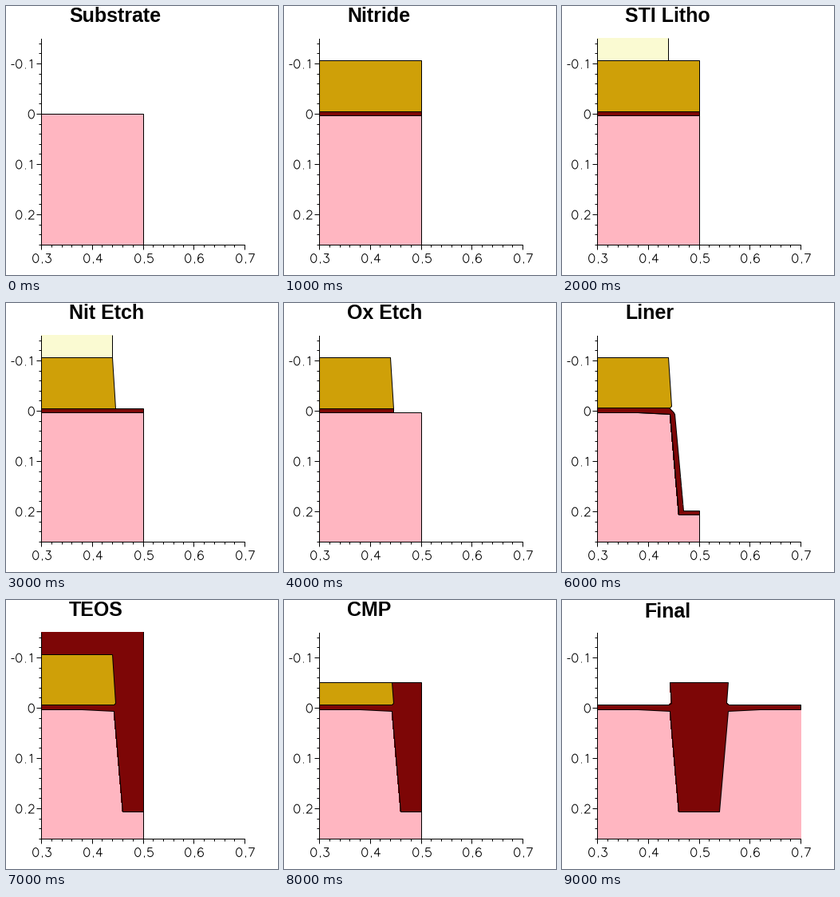
Animation, 341 px wide and 337 px high, one loop 10000 ms. Source, as a matplotlib script:

```python
import numpy as np
import matplotlib.pyplot as plt
from matplotlib.animation import ArtistAnimation

W, H, DPI = 341, 337, 64
PX = 72 / DPI
SILICON, OXIDE, NITRIDE, RESIST = "#ffb6c1", "#7d0606", "#cfa008", "#fafad2"

# Key positions of the cross-section, in pixels
LEFT, EDGE, RIGHT = 44, 172, 299
TOP, BASE = 40, 299
NIT_TOP, PAD_TOP, PAD_BOT, CMP_TOP = 68, 132, 137, 103
MASK = 133
SLOPE = np.tan(np.radians(5))

fig = plt.figure(figsize=(W / DPI, H / DPI), dpi=DPI, facecolor="white")
ax = fig.add_axes([0, 0, 1, 1])
ax.set_xlim(0, W)
ax.set_ylim(H, 0)
ax.axis("off")


def arc(cx, cy, rx, ry, start, end):
    t = np.radians(np.linspace(start, end, 25))
    return list(zip(cx + rx * np.cos(t), cy + ry * np.sin(t)))


# Stroke glyphs on a 20 x 21 grid, y up
GLYPHS = {
    "0": arc(10, 10.5, 7, 10.5, 0, 360),
    "1": [(6, 17), (11, 21), (11, 0)],
    "2": arc(10, 15, 6, 6, 170, -30) + [(3, 0), (17, 0)],
    "3": [(5, 21), (16, 21), (10, 13)] + arc(10, 6.5, 7, 6.5, 90, -160),
    "4": [(13, 0), (13, 21), (3, 7), (18, 7)],
    "5": [(15, 21), (5, 21), (4, 12)] + arc(10, 7, 7, 7, 130, -155),
    "6": arc(11, 10.5, 7, 10.5, 45, 180) + arc(10.5, 6.5, 6.5, 6.5, 180, -180),
    "7": [(3, 21), (17, 21), (7, 0)],
    ".": [(5, 0), (5, 2)],
    "-": [(1, 9), (9, 9)],
}
SCALE = 0.52


def advance(ch):
    return SCALE * (10 if ch in ".-" else 20)


def line(pts, cap="projecting", snap=True, z=2):
    return ax.plot(*zip(*pts), color="black", lw=PX, snap=snap, zorder=z,
                   solid_capstyle=cap, solid_joinstyle="miter")[0]


def label(text, x, base, align):
    x -= align * sum(map(advance, text))
    for ch in text:
        line([(x + SCALE * u, base - SCALE * v) for u, v in GLYPHS[ch]], "butt", None)
        x += advance(ch)


def draw_axes():
    line([(LEFT, TOP + 1), (LEFT, BASE)], z=4)
    line([(LEFT, BASE), (RIGHT, BASE)], z=4)
    for i in range(-7, 21):
        size = 6 if i % 5 == 0 else 3
        if i >= 0:
            x = round(LEFT + 12.75 * i)
            line([(x, BASE), (x, BASE + size)], "butt")
            if size == 6:
                label(f"{0.3 + 0.02 * i:.1f}", x + 1, 321.5, 0.5)
        if i <= 13:
            y = round(135 + 12.6 * i)
            line([(LEFT - size, y), (LEFT, y)], "butt")
            if size == 6:
                label(f"{0.02 * i:.1f}" if i else "0", 37, y + 6, 1)


def fill(color, pts):
    return ax.fill(*zip(*pts), color=color, lw=0, antialiased=False, zorder=1)[0]


def shape(color, pts):
    return [fill(color, pts), line(pts + pts[:1])]


def box(x0, y0, x1, y1):
    return [(x0, y0), (x1, y0), (x1, y1), (x0, y1)]


def title(text, x=79, base=20.5):
    return [ax.text(x, base, text, family="Liberation Sans", weight="bold",
                    size=25 * PX, va="baseline", ha="left")]


def wall(x, top, floor):
    """Sloped trench side and the floor out to the edge."""
    return [(x, top), (x + SLOPE * (floor - top), floor), (EDGE, floor)]


def block(top=PAD_BOT):
    return shape(SILICON, box(LEFT, top, EDGE, BASE))


def trench(surface):
    return shape(SILICON, surface + [(EDGE, BASE), (LEFT, BASE)])


def pad(right=EDGE):
    return shape(OXIDE, box(LEFT, PAD_TOP, right, PAD_BOT))


def nitride(corner=MASK, foot=MASK + 4, top=NIT_TOP, bottom=PAD_TOP, cut=0):
    """Nitride slab; cut trims its lower right corner."""
    return shape(NITRIDE, [(LEFT, top), (corner, top), (foot, bottom - cut),
                           (foot - cut, bottom), (LEFT, bottom)])


def resist():
    return [fill(RESIST, box(LEFT, TOP, MASK, NIT_TOP)),
            line([(MASK, TOP), (MASK, NIT_TOP)], "butt")]


def oxide_fill(top):
    """Oxide over the well, outlined on top only when polished."""
    edge = [(EDGE, top), (EDGE, WELL[-1][1])]
    if top > TOP:
        edge.insert(0, (LEFT, top))
    return [fill(OXIDE, [(LEFT, top), (EDGE, top)] + WELL[::-1]), line(edge)]


def mirror(pts):
    return [(LEFT + RIGHT - x, y) for x, y in pts]


def final():
    upper = [(LEFT, PAD_TOP - 1), (MASK + 1, PAD_TOP - 1),
             (MASK + 4, PAD_TOP - 3), (MASK + 2, CMP_TOP)]
    lower = WELL[:-1]
    outline = upper + mirror(upper)[::-1] + mirror(lower) + lower[::-1]
    return [fill(SILICON, box(LEFT, PAD_BOT, RIGHT + 1, BASE))] + shape(OXIDE, outline)


FLAT = [(LEFT, PAD_BOT)]
WELL = FLAT + [(95, PAD_BOT)] + wall(135, 139, 265)
LINER = [(LEFT, PAD_TOP - 1), (MASK + 1, PAD_TOP - 1), (139, 136)] + wall(141, 139, 260)

draw_axes()
steps = [
    title("Substrate") + block(135),
    title("Nitride") + block() + pad() + nitride(EDGE, EDGE),
    title("STI Litho") + block() + pad() + nitride(EDGE, EDGE) + resist(),
    title("Nit Etch") + block() + pad() + nitride() + resist(),
    title("Ox Etch") + block() + pad(MASK + 4) + nitride(),
    title("Trench Etch") + trench(FLAT + wall(138, PAD_BOT, 263))
    + pad(MASK + 4) + nitride(),
    title("Liner") + trench(WELL) + shape(OXIDE, LINER + WELL[::-1])
    + nitride(bottom=PAD_TOP - 1, cut=2),
    title("TEOS") + trench(WELL) + oxide_fill(TOP) + nitride(bottom=PAD_TOP - 1, cut=2),
    title("CMP") + trench(WELL) + oxide_fill(CMP_TOP)
    + nitride(MASK + 2, top=CMP_TOP, bottom=PAD_TOP - 1, cut=2),
    title("Final", 103.5, 22.5) + final(),
]

anim = ArtistAnimation(fig, steps, interval=1000, repeat=True, repeat_delay=0)
plt.show()
```
